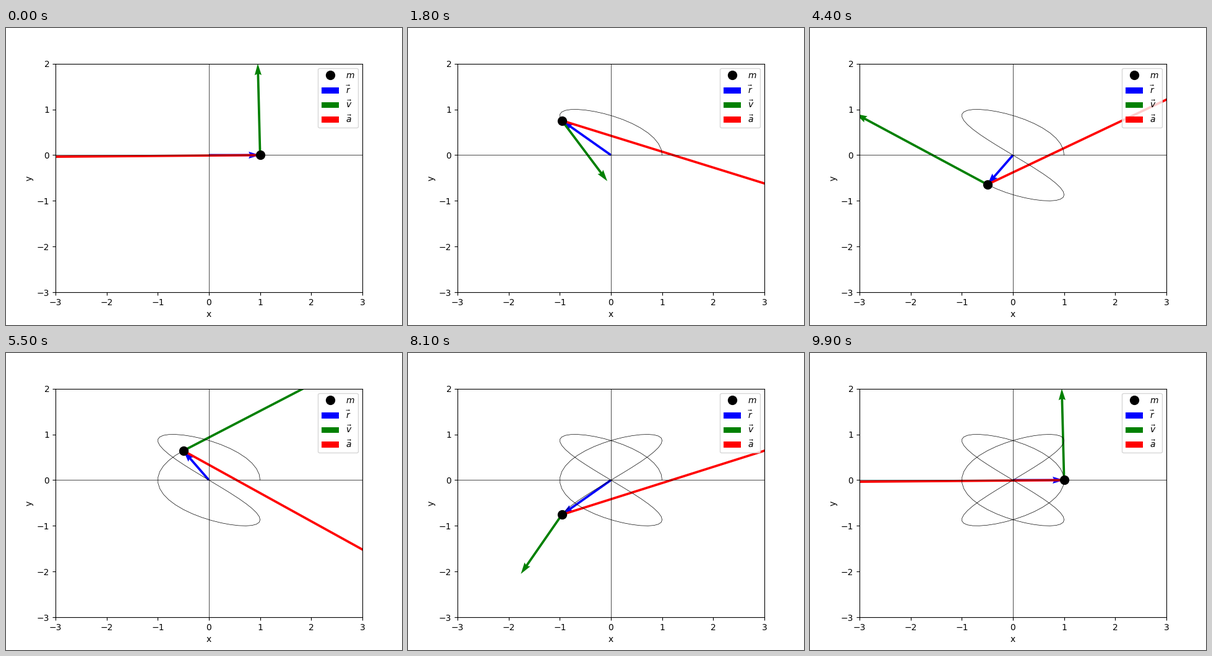
Write a matplotlib script that moves like this. It is 640 px wide and 480 px high and loops after 10 s.

```python
import matplotlib.pyplot as plt
import numpy as np
from matplotlib.animation import FuncAnimation

FRAMES = 100
DT = 0.01


def position(t):
    return np.array([np.cos(3 * t), np.sin(2 * t)])


def velocity(t):
    return (position(t + DT) - position(t)) / DT


def acceleration(t):
    return (velocity(t + DT) - velocity(t)) / DT


times = np.linspace(0, 2 * np.pi, FRAMES)
path = position(times)

fig, ax = plt.subplots(figsize=(6.4, 4.8), dpi=100)
ax.set(xlim=(-3, 3), ylim=(-3, 2), xlabel="x", ylabel="y")
ax.axhline(0, color="black", lw=0.5)
ax.axvline(0, color="black", lw=0.5)

trail, = ax.plot([], [], color="black", lw=0.5)
mass, = ax.plot([], [], "o", color="black", ms=10, label="$m$")


def arrow(color, name):
    return ax.quiver([0], [0], [1], [0], color=color, angles="xy",
                     scale_units="xy", scale=1, label=rf"$\vec{{{name}}}$")


r_arrow = arrow("blue", "r")
v_arrow = arrow("green", "v")
a_arrow = arrow("red", "a")
ax.legend(loc="upper right")


def place(quiver, start, vector):
    quiver.set_offsets([start])
    quiver.set_UVC(vector[:1], vector[1:])


def update(i):
    t, r = times[i], path[:, i]
    trail.set_data(path[0, :i + 1], path[1, :i + 1])
    mass.set_data(r[:1], r[1:])
    place(r_arrow, (0, 0), r)
    place(v_arrow, r, velocity(t))
    place(a_arrow, r, acceleration(t))
    return trail, mass, r_arrow, v_arrow, a_arrow


anim = FuncAnimation(fig, update, frames=FRAMES, interval=100,
                     repeat=True, repeat_delay=0)
plt.show()
```
